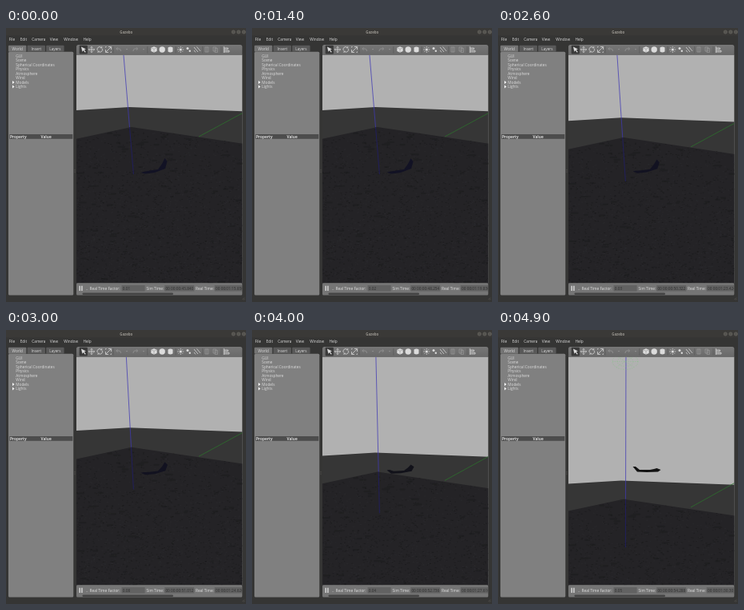
These frames come from a looping animation (300x343 px, 5 s). An HTML page:

```html
<!DOCTYPE html>
<html lang="en">
<head>
<meta charset="utf-8">
<title>Simulator window</title>
<style>
html, body { margin: 0; width: 100%; height: 100%; overflow: hidden; background: #353534; }
svg { display: block; width: 300px; height: 343px; }
text { font-family: "Open Sans", "Noto Sans", sans-serif; font-size: 4.75px; fill: #dadada; white-space: pre; }
.b { font-weight: 700; }
.ic { fill: none; stroke: #d6d6d6; stroke-width: .8; }
.dim { stroke: #959595; }
.lt { fill: #dcdcdc; }
</style>
</head>
<body>
<svg viewBox="0 0 300 343">
  <defs>
    <clipPath id="view"><rect x="88" y="33.5" width="207.3" height="286"/></clipPath>
    <clipPath id="soil"><path id="soilClip"/></clipPath>
    <clipPath id="bar"><rect x="88" y="319" width="207" height="15.5"/></clipPath>
    <linearGradient id="tools" x1="0" y1="0" x2="0" y2="1">
      <stop offset="0" stop-color="#777"/><stop offset="1" stop-color="#696969"/>
    </linearGradient>
  </defs>

  <rect width="300" height="343" fill="#353534"/>
  <rect width="300" height="9.5" fill="#3a3937"/>
  <text x="150.3" y="6.7" text-anchor="middle" class="b" style="font-size:4.4px;fill:#98958f">Gazebo</text>
  <g fill="#54534f" stroke="#76746f" stroke-width=".5">
    <circle cx="284.3" cy="5" r="2.1"/><circle cx="290.8" cy="5" r="2.1"/><circle cx="297.3" cy="5" r="2.1"/>
  </g>
  <g id="labels"></g>

  <g clip-path="url(#view)">
    <rect x="88" y="33" width="208" height="287" fill="#b1b1b1"/>
    <path id="far" fill="#363636"/>
    <path id="near" fill="#242326"/>
    <g clip-path="url(#soil)">
      <g id="grain" fill="none" stroke-linecap="round"></g>
    </g>
    <path id="green" fill="none" stroke="#2c702c" stroke-width=".8"/>
    <path id="axis" fill="none" stroke="#3f39b4" stroke-width=".75"/>
    <path id="axisLow" fill="none" stroke="#211e6c" stroke-width=".75"/>
    <g id="lamp" fill="none" stroke="#7fc77f" stroke-width=".6" stroke-dasharray="1.2 1.6" opacity=".75">
      <ellipse rx="16" ry="10"/><ellipse rx="10" ry="6"/><path d="M-16 0H16M-11 -7L11 7M-11 7L11 -7"/>
    </g>
    <path id="plane"/>
  </g>

  <path d="M88 33.6V23.5q0-2.5 2.5-2.5h302.5" fill="none"/>
  <path d="M88 33.6v-10.1q0-2.5 2.5-2.5h202.3q2.5 0 2.5 2.5v10.1z" fill="url(#tools)"/>
  <rect x="91.7" y="21.8" width="10.2" height="10.6" rx="1" fill="#3a3a3a"/>
  <path class="lt" d="M94 23.5l6 3-2.2.8 2 2.6-1 .8-2-2.6-1.4 1.7z"/>
  <path class="ic" d="M103.4 27h7.2M107 23.4v7.2M105.8 24.6l1.2-1.2 1.2 1.2M105.8 29.4l1.2 1.2 1.2-1.2M104.6 25.8l-1.2 1.2 1.2 1.2M109.4 25.8l1.2 1.2-1.2 1.2"/>
  <path class="ic" d="M114.5 28.3a3 3 0 0 1 4.6-3.8m1.1 1.2a3 3 0 0 1-4.5 3.8M118 24.8h1.8v-1.8M116.8 29.2H115V31"/>
  <path class="ic" d="M125 30l6-6M128 23.5h3.5v3.5M124.5 27v3.5h3.5M124.5 24.5v-1h1M131.5 29.5v1h-1"/>
  <path class="ic dim" d="M143.5 29q0-3-2-3H138M139.6 24.4L137.8 26l1.8 1.7M159 29q0-3 2-3h3.5M162.9 24.4l1.8 1.6-1.8 1.7M150 26.6h2M171 26.6h2"/>
  <path class="lt" d="M181.3 24.8l3.7-1.6 3.7 1.6v4.2l-3.7 1.8-3.7-1.8z"/>
  <path d="M181.3 24.8l3.7 1.5 3.7-1.5M185 26.3v4.5" fill="none" stroke="#888" stroke-width=".5"/>
  <circle class="lt" cx="195.2" cy="27" r="3.7"/>
  <path class="lt" d="M202.5 24.5q3-2 6 0v5q-3 2-6 0z"/>
  <circle class="lt" cx="218.3" cy="27" r="1.6"/>
  <path class="ic" d="M218.3 23v1.6M218.3 29.4V31M214.3 27h1.6M220.7 27h1.6M215.5 24.2l1.1 1.1M221.1 24.2L220 25.3M215.5 29.8l1.1-1.1M221.1 29.8L220 28.7"/>
  <circle class="lt" cx="227" cy="25.6" r="1.5"/><circle class="lt" cx="229.8" cy="28.8" r="1.2"/>
  <path class="ic" d="M235 24l5 6M238.5 23.5l4.5 5.4M235 28l2 2.4"/>
  <path class="ic dim" d="M249 24h4v6h-4zM251 24.2v5.6M259 24h3.5v5H259zM261 25.4h3.5v5H261z"/>
  <path class="ic" d="M272.5 23.2v7.8M273 25h4.5v1.6H273M273 28.4h6V30H273"/>
  <path d="M134.2 23v8.5M176.8 23v8.5M212.2 23v8.5M245.8 23v8.5M269 23v8.5" stroke="#555" stroke-width=".6"/>

  <rect x="88" y="319.3" width="207.3" height="15.2" rx="1.5" fill="#757575"/>
  <g clip-path="url(#bar)">
    <path class="lt" d="M91.5 322.7h1.4v6.4h-1.4zM94.2 322.7h1.4v6.4h-1.4z"/>
    <path d="M100.2 327.5h2" stroke="#a0a0a0" stroke-width=".7"/>
    <path d="M144.6 322h29v7.6h-29zM198.3 322h37v7.6h-37zM260.7 322h36v7.6h-36z" fill="#626262"/>
    <g id="status"></g>
    <rect x="95.5" y="331.4" width="113.5" height="2.5" rx="1.2" fill="#454545"/>
  </g>
  <path d="M86 177v5" stroke="#77756f" stroke-width=".7" stroke-dasharray=".7 1"/>
  <path d="M295.5 340l2.5-2.5M297 340.5l1.5-1.5" stroke="#66645f" stroke-width=".5"/>
</svg>
<script>
const $ = id => document.getElementById(id);
const put = (id, d) => $(id).setAttribute("d", d);
const NS = "http://www.w3.org/2000/svg";

function add(parent, tag, attrs, words) {
  const el = document.createElementNS(NS, tag);
  for (const k in attrs) el.setAttribute(k, attrs[k]);
  if (words) el.textContent = words;
  $(parent).appendChild(el);
  return el;
}
const label = (x, y, words, cls = "") => add("labels", "text", { x, y, class: cls }, words);
const box = (x, y, width, height, fill, rx = 0) =>
  add("labels", "rect", { x, y, width, height, fill, rx });

// Menus, tabs and the side panel
[["File", 3.7], ["Edit", 17.7], ["Camera", 32.3], ["View", 54.8], ["Window", 72.2], ["Help", 96.4]]
  .forEach(([s, x]) => label(x, 15.7, s));
box(3, 29.8, 81.3, 304.6, "#808080", 1.5);
["World", "Insert", "Layers"].forEach((s, i) => {
  const x = 3 + i * 23.6;
  box(x, 21.8, 22.4, 8, i ? "#595959" : "#747474", 1);
  add("labels", "text", { x: x + 11.2, y: 27.5, "text-anchor": "middle" }, s);
});
["GUI", "Scene", "Spherical Coordinates", "Physics", "Atmosphere", "Wind", "Models", "Lights"]
  .forEach((s, i) => {
    const y = 36.7 + i * 5.5;
    label(12.3, y, s);
    if (i > 5) add("labels", "path", { d: `M8 ${y - 3.7}l2.6 2-2.6 2z`, fill: "#f4f4f4" });
  });
box(4.3, 133, 79, 5.8, "#4c4c4c");
label(4.9, 137.5, "Property", "b");
label(43.5, 137.5, "Value", "b");

const status = (x, words, fill = "#303030") =>
  add("status", "text", { x, y: 327.5, style: `fill:${fill}` }, words);
status(104.6, "Real Time Factor:", "#e2e2e2");
status(175.6, "Sim Time:", "#e2e2e2");
status(237, "Real Time:", "#e2e2e2");
const factor = status(145.8, "");
const simTime = status(199.4, "");
const realTime = status(262, "");

// Seeded soil: soft lumps near the far corner, fine grain towards the viewer
let seed = 11;
const rnd = () => (seed = (seed * 16807) % 2147483647) / 2147483647;
function scatter(count, stroke, width, length, bias) {
  let d = "";
  for (let i = 0; i < count; i++) {
    const x = 86 + rnd() * 212, y = 200 * rnd() ** bias;
    d += `M${x.toFixed(1)} ${y.toFixed(1)}h${(length * rnd()).toFixed(1)}`;
  }
  add("grain", "path", { d, stroke, "stroke-width": width });
}
scatter(90, "#1f1f21", 2.2, 9, 1.3);
scatter(1500, "#1a1a1c", .7, 1.6, .8);
scatter(1300, "#2d2c30", .6, 1.3, .7);

// Aircraft outline: x, y when banked, then the shift that levels it
const craft = [
  [168.5, 181, 0, -10], [172, 180, 0, -9], [177, 179, 0, -4], [190, 177, 0, -2], [195, 170, 0, 4],
  [198.5, 163, 0, 10], [201.5, 167, 2, 8], [199, 176, 1, 1.5], [186, 181, 0, -3], [174, 182.5, 0, -5]
];

const two = n => String(Math.floor(n)).padStart(2, "0");
const clock = s =>
  `00 00:${two(s / 60)}:${two(s % 60)}.${String(Math.round(s * 1000) % 1000).padStart(3, "0")}`;

function draw(ms) {
  const t = Math.floor(ms / 100) / 10;

  // The camera tilts up, so the scene sinks by an accelerating drop
  const drop = 89.5 * (Math.max(0, t - 1.7) / 3.2) ** 1.5;
  const horizon = 99 + drop;
  const corner = 124 + drop * .98;
  put("far", `M87 ${horizon + 4}L154 ${horizon}L297 ${horizon + 5.3}V320H87Z`);
  const soil = `M87 ${corner + 15}L157 ${corner}L297 ${corner + 21}V320H87Z`;
  put("near", soil);
  put("soilClip", soil);
  $("grain").setAttribute("transform", `translate(0 ${corner})`);
  put("green", `M241 ${136 + drop * .96}L296 ${106.3 + drop * .95}`);

  const topX = 147 + drop * .145, footX = 159.4;
  const footY = 183 + drop * .62 + drop * drop * .0042;
  const midX = topX + (footX - topX) * (corner - 34) / (footY - 34);
  put("axis", `M${topX} 34L${midX} ${corner}`);
  put("axisLow", `M${midX} ${corner}L${footX} ${footY}`);
  $("lamp").setAttribute("transform", `translate(159 ${horizon - 149})`);
  $("lamp").style.display = t > 4.4 ? "" : "none";

  const level = (t / 4.9) ** 3;
  put("plane", "M" + craft.map(([x, y, dx, dy]) => [x + dx * level, y + dy * level]).join(" ") + "Z");
  $("plane").setAttribute("fill", `rgb(18,18,${Math.round(36 - 18 * level)})`);

  factor.textContent = "0.0" + (1 + Math.floor(t / .6) * 5 % 9);
  simTime.textContent = clock(45.84 + t * 1.724);
  realTime.textContent = clock(75.65 + t * 2.99);
}

const start = performance.now();
function tick() {
  draw((performance.now() - start) % 5000);
  requestAnimationFrame(tick);
}
draw(0);
requestAnimationFrame(tick);
</script>
</body>
</html>
```
